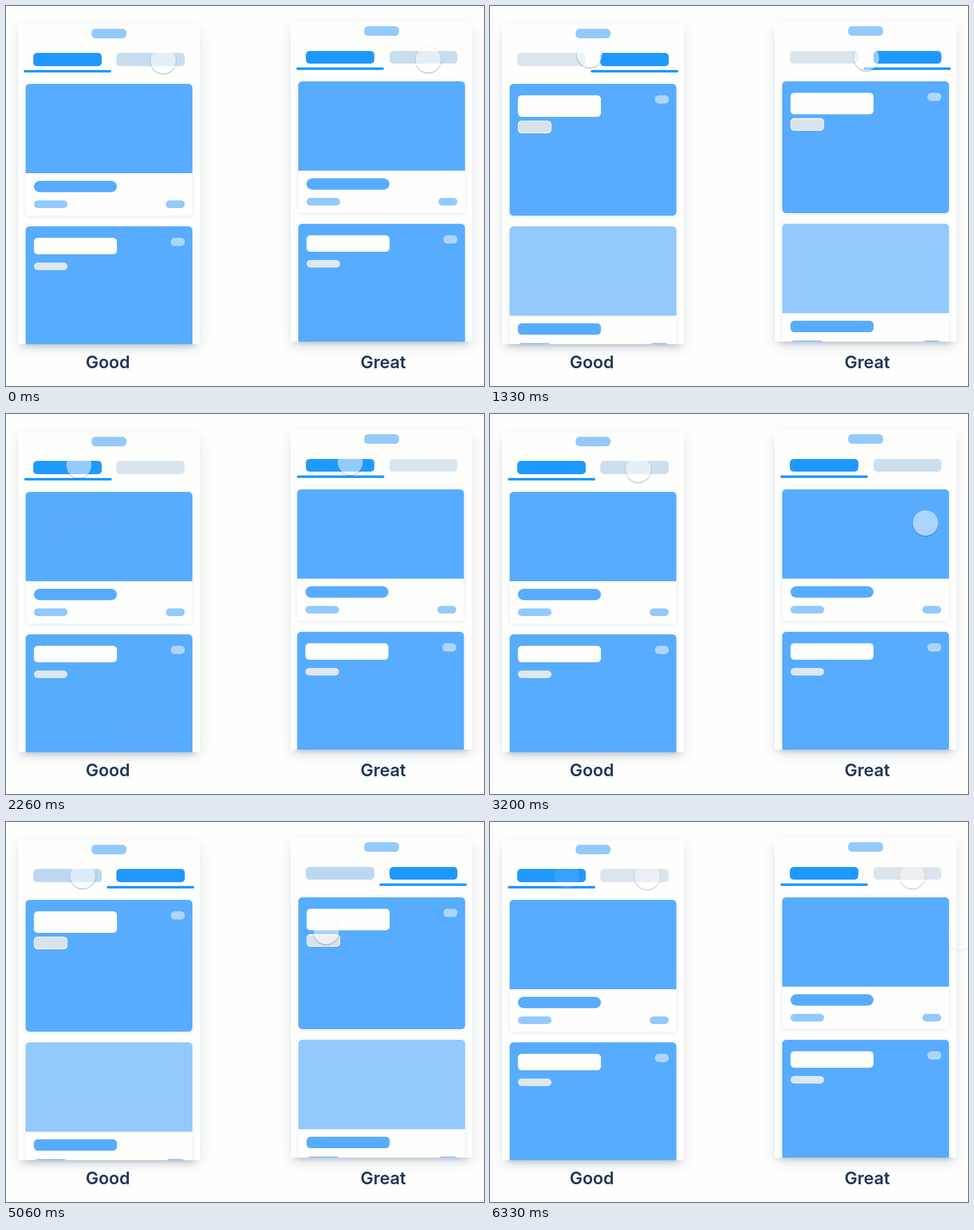
An HTML page for the animation above (6400 ms loop, 754 px wide and 600 px high).

```html
<!DOCTYPE html>
<html lang="en">
<head>
<meta charset="utf-8">
<title>Tabs: good and great</title>
<style>
html, body { margin: 0; width: 100%; height: 100%; overflow: hidden; background: #fefefd; }
div { position: absolute; box-sizing: border-box; }
.great { left: 430.3px; top: -3.7px; }
.shell, .clip { left: 19px; top: 30px; width: 287px; height: 504px; }
.shell { background: #fefefd; box-shadow: 0 7px 20px rgba(50, 85, 125, .13), 0 9px 11px -9px rgba(45, 60, 85, .42); }
.clip { overflow: hidden; }
.inner { left: -19px; top: -30px; }
.page { left: 0; top: 0; }
.card { overflow: hidden; background: #fefefd; }
.shade { box-shadow: 0 1px 6px rgba(50, 80, 120, .13); }
.cursor { width: 40px; height: 40px; margin: -20px; border-radius: 50%; background: rgba(255, 255, 255, .5);
  box-shadow: 0 1px 2px rgba(45, 65, 100, .5); }
.label { top: 548px; width: 200px; text-align: center; font: 600 27px/30px Inter, sans-serif; color: #1f3557; }
</style>
</head>
<body>
<script>
const LOOP = 6400, PAGE = 279, TAB = 131;
const ACTIVE = '#1e98ff', BLUE = '#57acff', SOFT = '#93c9fd', PALE = '#dbe5ed', WHITE = '#fefefd';

const box = (x, y, w, h, color, r = 6, cls = '') =>
  `<div class="${cls}" style="left:${x}px;top:${y}px;width:${w}px;height:${h}px;background:${color};border-radius:${r}px"></div>`;

// Card with a picture on top and text bars below
const article = (y, color, r) =>
  box(31, y, 263, 208.5, WHITE, 6, 'shade') +
  box(31, y, 263, 141, color, '6px 6px 0 0') .replace('0px"', '0"') +
  box(43.5, y + 153, 131, 18.5, BLUE, r) +
  box(43.5, y + 184, 53.5, 12.5, SOFT) +
  box(252, y + 184, 30, 12.5, SOFT);

// Solid card with a white title
const banner = (y, titleH, pillY, pillH, edge) =>
  box(31, y, 263, 208.5, BLUE, 6, 'shade') +
  box(43.5, y + 18.5, 131, titleH, WHITE) +
  box(43.5, y + pillY, 53.5, pillH, edge) +
  box(259.5, y + 18.5, 22.5, 12.5, '#aed6fa');

const pageA = article(122.5, BLUE, 9) + banner(347.5, 26, 57, 12.5, '#dee8f0');
const pageB = banner(122.5, 33.5, 58.5, 19.5, '#f3f7fb') + box(44.7, 182.2, 51.1, 17.1, '#d9e3ec', 5) +
  article(347.5, SOFT, 6);

const phone = kind => `<div class="${kind}">
  <div class="shell"></div>
  <div class="clip"><div class="inner">
    ${box(135, 36, 55, 14.5, SOFT)}
    ${[43.2, 174.3].map(x => box(x, 74.3, 107.7, 20.7, PALE) + box(x, 74.3, 107.7, 20.7, ACTIVE, 6, 'tab')).join('')}
    ${box(28, 101, 138, 4, ACTIVE, 2, 'line')}
    <div class="page">${pageA}</div><div class="page">${pageB}</div>
  </div></div></div>`;

document.body.innerHTML = phone('good') + phone('great') +
  '<div class="label" style="left:60.7px">Good</div><div class="label" style="left:495px">Great</div>' +
  '<div class="cursor"></div>'.repeat(4);

const all = s => [...document.querySelectorAll(s)];
const tabs = all('.tab'), lines = all('.line'), cursors = all('.cursor');
const goodPages = all('.good .page'), greatPages = all('.great .page');

const span = (t, a, b) => Math.min(1, Math.max(0, (t - a) / (b - a)));
const cubic = p => p < .5 ? 4 * p ** 3 : 1 - 4 * (1 - p) ** 3;
const sine = p => (1 - Math.cos(Math.PI * p)) / 2;

// Page changes: forward, back, forward, back
const slides = [[0, 600], [1730, 2330], [3220, 3730], [5030, 5600]];

// Cursor moves: start, end, x, y, optional control point, easing
const paths = [
  { from: [248, 86.5], moves: [
    [800, 1700, 115, 81, [169, 71]],
    [2330, 3150, 234, 87.5],
    [4000, 5000, 121, 85]] },
  { from: [666, 85], moves: [
    [800, 1700, 543, 76, [619, 86.6]],
    [2330, 3150, 687, 172],
    [...slides[2], 457, 147, null, cubic],
    [4000, 5000, 505, 173],
    [...slides[3], 742, 182, null, cubic]] },
];

function locate({ from, moves }, t) {
  let [x, y] = from;
  for (const [a, b, tx, ty, ctrl, ease = sine] of moves) {
    if (t <= a) break;
    const p = ease(span(t, a, b)), q = 1 - p;
    const [cx, cy] = ctrl || [(x + tx) / 2, (y + ty) / 2];
    x = q * q * x + 2 * p * q * cx + p * p * tx;
    y = q * q * y + 2 * p * q * cy + p * p * ty;
  }
  return [x, y];
}

function place(el, [x, y], opacity) {
  el.style.transform = `translate(${x}px,${y}px)`;
  el.style.opacity = opacity;
}

function draw(t) {
  const e = slides.map(([a, b]) => cubic(span(t, a, b)));
  // The tapped tab lights up slightly before the page moves
  const lead = slides.map(([a, b]) => span(t, a - 60, b - 60));
  const p = e[0] - e[1] + e[2] - e[3];
  const lit = [1 - e[0] + lead[1] - e[2] + lead[3], lead[0] - e[1] + lead[2] - e[3]];

  tabs.forEach((el, i) => el.style.opacity = lit[i % 2]);
  lines.forEach(el => el.style.transform = `translateX(${p * TAB}px)`);
  goodPages.forEach((el, i) => el.style.opacity = i ? p : 1 - p);
  greatPages.forEach((el, i) => el.style.transform = `translateX(${(i - p) * PAGE}px)`);

  const fade = span(t, 6070, LOOP);
  paths.forEach((path, i) => {
    place(cursors[i], locate(path, t), 1 - fade);
    place(cursors[i + 2], path.from, fade);
  });
}

const start = performance.now();
(function tick() {
  draw((performance.now() - start) % LOOP);
  requestAnimationFrame(tick);
})();
</script>
</body>
</html>
```
